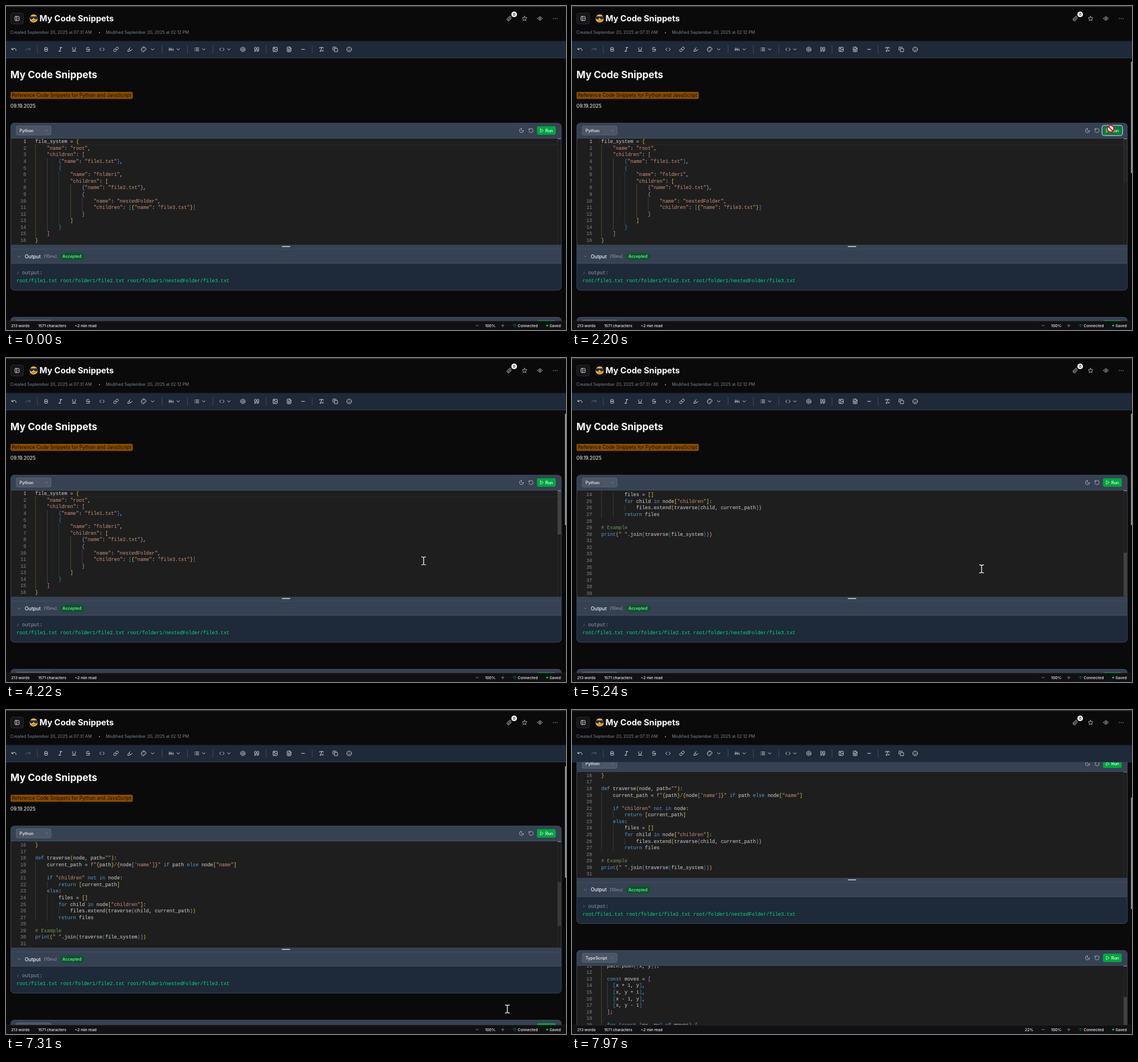
These frames come from a looping animation (983 px wide and 570 px high, 8000 ms). An HTML page:

```html
<!DOCTYPE html>
<html lang="en">
<head>
<meta charset="utf-8">
<title>My Code Snippets</title>
<style>
  html, body { margin: 0; width: 100%; height: 100%; overflow: hidden; background: #0a0a0a; }
  #stage { display: block; width: 100vw; height: 100vh; }
  text { font-family: Inter, sans-serif; white-space: pre; }
  .mono { font-family: "Liberation Mono", monospace; font-size: 8.54px; }
  .icon { fill: none; stroke-linecap: round; stroke-linejoin: round; }
</style>
</head>
<body>
<svg id="stage" viewBox="0 0 983 570"></svg>
<script>
const LOOP = 8000, STEP = 67.2;
const LINE = 11.58, CHAR = 5.124, CODE_X = 51.3;
const EDITOR_H = 187, CODE_H = 39 * LINE;
const GRAY7 = '#364153', GRAY8 = '#1e2939', BORDER = '#4a5565', MUTED = '#99a1af';
const GREEN = '#00a63e', GREEN_HOVER = '#008236';

const ICONS = {
  panel: 'M5 3h14a2 2 0 0 1 2 2v14a2 2 0 0 1-2 2H5a2 2 0 0 1-2-2V5a2 2 0 0 1 2-2zM9 3v18M14 9l3 3-3 3',
  clip: 'm21.44 11.05-9.19 9.19a6 6 0 0 1-8.49-8.49l8.57-8.57A4 4 0 1 1 18 8.84l-8.59 8.57a2 2 0 0 1-2.83-2.83l8.49-8.48',
  star: 'm12 2 3.1 6.3 6.9 1-5 4.9 1.2 6.8-6.2-3.2L5.8 21 7 14.2 2 9.3l6.9-1z',
  eye: 'M2 12s3.6-7 10-7 10 7 10 7-3.6 7-10 7-10-7-10-7zM15 12a3 3 0 1 1-6 0 3 3 0 0 1 6 0',
  dots: 'M4 12h.5M12 12h.5M20 12h.5',
  undo: 'M3 7v6h6M21 17a9 9 0 0 0-9-9 9 9 0 0 0-6 2.3L3 13',
  redo: 'M21 7v6h-6M3 17a9 9 0 0 1 9-9 9 9 0 0 1 6 2.3l3 2.7',
  bold: 'M6 12h9a4 4 0 0 1 0 8H7a1 1 0 0 1-1-1V5a1 1 0 0 1 1-1h7a4 4 0 0 1 0 8',
  italic: 'M19 4h-9M14 20H5M15 4 9 20',
  underline: 'M6 4v6a6 6 0 0 0 12 0V4M4 20h16',
  strike: 'M16 4H9a3 3 0 0 0-2.83 4M14 12a4 4 0 0 1 0 8H6M4 12h16',
  code: 'm16 18 6-6-6-6M8 6l-6 6 6 6',
  link: 'M10 13a5 5 0 0 0 7.54.54l3-3a5 5 0 0 0-7.07-7.07l-1.72 1.71M14 11a5 5 0 0 0-7.54-.54l-3 3a5 5 0 0 0 7.07 7.07l1.71-1.71',
  marker: 'm9 11-6 6v3h9l3-3M22 12l-4.6 4.6a2 2 0 0 1-2.8 0l-5.2-5.2a2 2 0 0 1 0-2.8L14 4',
  palette: 'M12 2a10 10 0 0 0 0 20c2 0 2.2-1.8 1.2-2.8-1-1.100-.2-2.800 1.200-2.800h2c3 0 5.600-2.500 5.600-5.600C22 6 17.500 2 12 2zM13.500 6.500h.01M17.500 10.500h.01M8.500 7.500h.01M6.500 12.500h.01',
  down: 'm6 9 6 6 6-6',
  right: 'm9 18 6-6-6-6',
  h1: 'M4 12h8M4 18V6M12 18V6M17 12l3-2v8',
  list: 'M3 6h.01M3 12h.01M3 18h.01M8 6h13M8 12h13M8 18h13',
  nut: 'M21 16V8a2 2 0 0 0-1-1.73l-7-4a2 2 0 0 0-2 0l-7 4A2 2 0 0 0 3 8v8a2 2 0 0 0 1 1.73l7 4a2 2 0 0 0 2 0l7-4A2 2 0 0 0 21 16zM16 12a4 4 0 1 1-8 0 4 4 0 0 1 8 0',
  quote: [16, 5].map(x => `M${x} 3a2 2 0 0 0-2 2v6a2 2 0 0 0 2 2 1 1 0 0 1 1 1v1a2 2 0 0 1-2 2 1 1 0 0 0-1 1v2a1 1 0 0 0 1 1 6 6 0 0 0 6-6V5a2 2 0 0 0-2-2z`).join(''),
  image: 'M5 3h14a2 2 0 0 1 2 2v14a2 2 0 0 1-2 2H5a2 2 0 0 1-2-2V5a2 2 0 0 1 2-2zM11 9a2 2 0 1 1-4 0 2 2 0 0 1 4 0M21 15l-3.1-3.1a2 2 0 0 0-2.8 0L6 21',
  file: 'M15 2H6a2 2 0 0 0-2 2v16a2 2 0 0 0 2 2h12a2 2 0 0 0 2-2V7zM14 2v4a2 2 0 0 0 2 2h4M10 9H8M16 13H8M16 17H8',
  minus: 'M5 12h14',
  plus: 'M5 12h14M12 5v14',
  clear: 'M4 7V4h16v3M5 20h6M13 4 8 20M15 15l5 5M20 15l-5 5',
  copy: 'M10 8h10a2 2 0 0 1 2 2v10a2 2 0 0 1-2 2H10a2 2 0 0 1-2-2V10a2 2 0 0 1 2-2zM4 16a2 2 0 0 1-2-2V4a2 2 0 0 1 2-2h10a2 2 0 0 1 2 2',
  smile: 'M22 12a10 10 0 1 1-20 0 10 10 0 0 1 20 0M8 14s1.5 2 4 2 4-2 4-2M9 9h.01M15 9h.01',
  moon: 'M12 3a6 6 0 0 0 9 9 9 9 0 1 1-9-9',
  reset: 'M3 12a9 9 0 1 0 9-9 9.75 9.75 0 0 0-6.74 2.74L3 8M3 3v5h5',
  play: 'M6 3l14 9-14 9z',
  wifi: 'M12 20h.01M8.5 16.4a5 5 0 0 1 7 0M5 12.9a10 10 0 0 1 14 0M2 8.800a15 15 0 0 1 20 0',
};

const PYTHON = `file_system = {
    "name": "root",
    "children": [
        {"name": "file1.txt"},
        {
            "name": "folder1",
            "children": [
                {"name": "file2.txt"},
                {
                    "name": "nestedFolder",
                    "children": [{"name": "file3.txt"}]
                }
            ]
        }
    ]
}

def traverse(node, path=""):
    current_path = f"{path}/{node['name']}" if path else node["name"]

    if "children" not in node:
        return [current_path]
    else:
        files = []
        for child in node["children"]:
            files.extend(traverse(child, current_path))
        return files

# Example
print(" ".join(traverse(file_system)))` + '\n'.repeat(9);

const TYPESCRIPT = `  path.push([x, y]);

  const moves = [
    [x + 1, y],
    [x, y + 1],
    [x - 1, y],
    [x, y - 1]
  ];

  for (const [nx, ny] of moves) {
    dfs(nx, ny);
  }`;

// Markup helpers; y is the vertical centre of the text or icon
const rect = (x, y, w, h, fill, extra = '') =>
  `<rect x="${x}" y="${y}" width="${w}" height="${h}" fill="${fill}" ${extra}/>`;
const text = (x, y, s, size, fill, weight = 400, extra = '') =>
  `<text x="${x}" y="${y + size * .36}" font-size="${size}" fill="${fill}" font-weight="${weight}" ${extra}>${s}</text>`;
const mono = (x, y, s, fill, extra = '') =>
  `<text class="mono" x="${x}" y="${y + 2.7}" fill="${fill}" ${extra}>${s}</text>`;
const icon = (name, x, y, color = '#f3f4f6', size = 9.8, weight = 2) =>
  `<path class="icon" d="${ICONS[name]}" stroke="${color}" stroke-width="${weight}" transform="translate(${x} ${y}) scale(${size / 24}) translate(-12 -12)"/>`;
const clipped = (x, y, w, h, body) =>
  `<svg x="${x}" y="${y}" width="${w}" height="${h}" viewBox="${x} ${y} ${w} ${h}">${body}</svg>`;

const BRACKETS = ['#e8c84a', '#c690c2', '#2f93cf'];
const KEYWORDS = /^(def|if|else|for|in|not|return|print|const|of)$/;
const span = (s, fill) => `<tspan fill="${fill}">${s}</tspan>`;

function highlight(line, state) {
  return (line.match(/#.*|f?"[^"]*"|'[^']*'|\w+|[^]/g) || []).map(token => {
    if (token[0] === '#') return span(token, '#6a9955');
    if (token.startsWith('f"'))
      return token.split(/(\{[^}]*\})/).map(p => p[0] === '{' ? highlight(p, state) : span(p, '#ce9178')).join('');
    if (/^["']/.test(token)) return span(token, '#ce9178');
    if (KEYWORDS.test(token)) return span(token, '#569cd6');
    if (/^\d/.test(token)) return span(token, '#b5cea8');
    if (/[[({]/.test(token)) return span(token, BRACKETS[state.depth++ % 3]);
    if (/[\])}]/.test(token)) return span(token, BRACKETS[--state.depth % 3]);
    return token;
  }).join('');
}

function codeLines(source, first, top, tab, depth) {
  const lines = source.split('\n'), state = { depth };
  const indent = i => {
    while (i < lines.length && !lines[i]) i++;
    return i < lines.length ? lines[i].search(/\S/) : 0;
  };
  return lines.map((line, i) => {
    const y = top + 5.6 + (first + i - 1) * LINE;
    let out = mono(35.5, y, first + i, first + i === 1 ? '#c6c6c6' : '#858585', 'text-anchor="end"');
    for (let k = 0; k * tab < indent(i); k++) {
      const paired = state.depth > k;
      out += rect(CODE_X + .2 + k * tab * CHAR, y - LINE / 2, .7, LINE + .1,
        paired ? BRACKETS[k % 3] : '#454545', paired ? 'opacity=".38"' : '');
    }
    return out + mono(CODE_X, y, highlight(line, state), '#d4d4d4');
  }).join('');
}

function block(id, top, language, code) {
  const mid = top + 13, editor = top + 27;
  return rect(8.4, top, 966.4, 294, GRAY7, `rx="6" stroke="${BORDER}" stroke-width=".8"`)
    + rect(18, mid - 8, 61, 16, BORDER, 'rx="2.500" stroke="#6a7282" stroke-width=".7"')
    + text(23.8, mid + .3, language, 7.32, '#f3f4f6', 500) + icon('down', 71, mid, MUTED, 7)
    + icon('moon', 905, mid, '#b8bfca') + icon('reset', 921.7, mid, '#b8bfca')
    + rect(932, mid - 7.5, 33, 15, GREEN, `id="${id}-run" rx="3"`)
    + icon('play', 940.3, mid, '#fff', 8) + text(946.7, mid + .3, 'Run', 7.32, '#fff', 500)
    + rect(930.4, mid - 8.900, 36, 17.800, 'none', `id="${id}-ring" rx="4" stroke="#b4cdf2" stroke-width="1.3" visibility="hidden"`)
    + clipped(9, editor, 965.4, EDITOR_H,
        rect(9, editor, 966, EDITOR_H, '#1e1e1e') + `<g id="${id}-code">${code}</g>`
        + rect(968, editor, .6, EDITOR_H, '#333') + rect(968.6, editor, 6, 1.2, '#8a8a8a')
        + rect(968.4, editor, 6.2, EDITOR_H * EDITOR_H / CODE_H, '#797979', `id="${id}-slider" opacity="0"`))
    + rect(9, editor - .7, 965.4, .7, BORDER)
    + rect(484, top + 216.600, 15, 1.4, '#d1d5db', 'rx=".7"')
    + rect(9, top + 221.500, 965.4, .7, BORDER)
    + icon('down', 23.5, top + 234.5, MUTED, 8) + text(33, top + 234.5, 'Output', 8.54, '#f3f4f6', 500)
    + text(66.3, top + 234.5, '(10ms)', 7.32, MUTED)
    + rect(95, top + 228, 42.5, 13, '#0d542b', 'rx="6.5"') + text(99, top + 234.5, 'Accepted', 7.32, '#7bf1a8', 500)
    + `<path d="M8.800 ${top + 247}H974.400V${top + 288}a5.600 5.600 0 0 1-5.600 5.600H14.400a5.600 5.600 0 0 1-5.600-5.600z" fill="${GRAY8}"/>`
    + rect(9, top + 246.5, 965.4, .7, BORDER)
    + icon('right', 21, top + 263.7, MUTED, 7) + mono(28.3, top + 263.5, 'output:', MUTED)
    + mono(18.5, top + 277.5, 'root/file1.txt root/folder1/file2.txt root/folder1/nestedFolder/file3.txt', '#05df72');
}

const TOP = 206, TOP2 = 547.5;
const page = text(7.800, 121.3, 'My Code Snippets', 17.08, '#fff', 700)
  + rect(8, 151, 214.5, 12.5, '#894b00', 'rx="2"')
  + text(10, 157.3, 'Reference Code Snippets for Python and JavaScript', 8.54, '#0e0c08')
  + text(7.800, 175.5, '09.19.2025', 8.54, '#fff')
  + block('py', TOP, 'Python',
      rect(48, TOP + 27.400, 920, LINE - .8, 'none', 'stroke="#2a2a2a"') + codeLines(PYTHON, 1, TOP + 27, 4, 0))
  + block('ts', TOP2, 'TypeScript', codeLines(TYPESCRIPT, 11, TOP2 + 27, 2, 1));

const emoji = `<circle cx="48.5" cy="22" r="7.2" fill="#f5b13d"/>
  <path d="M41.500 18.300h14v2.200q-.4 3.300-3.300 3.300-2.700 0-3.200-3h-1q-.5 3-3.200 3-2.900 0-3.300-3.300z" fill="#252a3c"/>
  <path class="icon" d="M45.800 26q2.800 1.700 5.400-.4" stroke="#6b3b12" stroke-width=".9"/>`;

const header = rect(0, 0, 983, 92, '#0a0a0a') + rect(0, 0, 983, 1.800, '#303033')
  + rect(8.400, 12.400, 22.200, 19.200, '#161618', 'rx="4" stroke="#35353a" stroke-width=".8"')
  + icon('panel', 19.5, 22) + emoji
  + text(58.800, 22.2, 'My Code Snippets', 14.64, '#fff', 700)
  + text(7.800, 46.700, 'Created September 20, 2025 at 07:31 AM', 7.32, '#7d8490')
  + '<circle cx="164" cy="46.900" r="1.1" fill="#7d8490"/>'
  + text(175.2, 46.700, 'Modified September 20, 2025 at 02:12 PM', 7.32, '#7d8490')
  + icon('clip', 883.5, 22, '#d1d5db') + '<circle cx="892" cy="14.700" r="4.900" fill="#fafafa"/>'
  + text(892, 14.800, '0', 6.2, '#111', 600, 'text-anchor="middle"')
  + icon('star', 910.3, 22, '#d1d5db') + icon('eye', 937.3, 22, '#d1d5db') + icon('dots', 964, 22, '#f3f4f6', 9.8, 3)
  + rect(0, 61.500, 983, 30, GRAY8) + rect(0, 91, 983, .800, GRAY7)
  + Object.entries({
      14: 'undo', 70.5: 'bold', 95.3: 'italic', 119.5: 'underline', 144: 'strike', 168.5: 'code', 193: 'link',
      217.3: 'marker', 241.700: 'palette', 257.5: 'down', 290: 'h1', 302.3: 'down', 334.700: 'list', 346.900: 'down',
      379: 'code', 391.2: 'down', 415.700: 'nut', 440: 'quote', 472.5: 'image', 497: 'file', 521.4: 'minus',
      553.700: 'clear', 578: 'copy', 602.5: 'smile'
    }).map(([x, name]) => icon(name, x, 76.3)).join('')
  + icon('redo', 38.5, 76.3, '#68717f')
  + [55, 274, 318.3, 363, 456.3, 537.3].map(x => rect(x - .4, 69, .8, 14.5, BORDER)).join('');

const status = rect(0, 554, 983, 16, '#111113') + rect(0, 554, 983, .7, '#2a2a2e')
  + [[9, '213 words'], [56.5, '1571 characters'], [121, '~2 min read'], [841, '100%'], [898.3, 'Connected'], [954, 'Saved']]
      .map(([x, s]) => text(x, 562.3, s, 6.7, '#f3f4f6', 500)).join('')
  + text(810, 562.3, '', 6.7, '#f3f4f6', 500, 'id="percent" text-anchor="end"')
  + icon('minus', 827, 562.2, '#b8bfca', 7.5) + icon('plus', 872, 562.2, '#b8bfca', 7.5)
  + icon('wifi', 893, 562, '#0b8a3c', 7.5) + '<circle cx="950" cy="562.3" r="1.700" fill="#00c950"/>';

const cursors = {
  beam: '<path class="icon" d="M-3.500-7q3 0 3.500 1.300q.5-1.300 3.500-1.300M0-5.700V5.700M-3.500 7q3 0 3.500-1.300q.5 1.300 3.500 1.300" stroke="#fff" stroke-width="1.3"/>',
  arrow: '<path d="M0 0v13l3-2.800 2 4.600 2-.9-2-4.500h4z" fill="#fff" stroke="#111" stroke-width=".7"/>',
  hand: '<path d="M-1-5q1-1.300 2 0v4l5 1.200q1 .4.800 1.500L6 7H0L-4 2q0-1.300 1.300-1L-1 2z" fill="#fff" stroke="#111" stroke-width=".7"/>',
  blocked: '<circle r="5.700" fill="#fff" stroke="#c5161d" stroke-width="2"/><path d="M-4-4 4 4" stroke="#c5161d" stroke-width="2.2"/>',
};

const stage = document.getElementById('stage');
stage.innerHTML = rect(0, 0, 983, 570, '#0a0a0a')
  + clipped(0, 91.5, 983, 463, `<g id="page">${page}</g>`)
  + header + status + rect(981.3, 98, 1.700, 196, '#a1a1aa', 'id="scrollbar"')
  + Object.entries(cursors).map(([name, body]) => `<g id="${name}">${body}</g>`).join('');

const $ = id => document.getElementById(id);
const set = (id, name, value) => $(id).setAttribute(name, value);
const show = (id, on) => set(id, 'visibility', on ? 'visible' : 'hidden');
const shift = (id, x, y) => set(id, 'transform', `translate(${x} ${y})`);

// Piecewise linear value from [time, value, ...] keys; column picks the value
function track(keys, t, column = 1) {
  const i = keys.findIndex(k => k[0] > t);
  if (i === 0) return keys[0][column];
  if (i < 0) return keys[keys.length - 1][column];
  const a = keys[i - 1], b = keys[i];
  return a[column] + (b[column] - a[column]) * (t - a[0]) / (b[0] - a[0]);
}

const POINTER = [[1200, 990, 252], [1450, 968, 240], [1870, 945.5, 216], [3770, 945.5, 216], [4000, 850, 285],
  [4217, 733, 357], [4490, 719, 371], [5840, 719, 371], [6240, 733, 381], [6380, 733, 381], [6570, 738, 384],
  [6650, 738, 384], [6780, 768, 412], [6910, 852, 521], [7040, 877, 548], [7170, 880, 526], [7308, 880, 526],
  [7442, 887, 516], [7800, 992, 500]];
const PAGE_SCROLL = [[7240, 0], [7308, 2], [7375, 62], [7442, 86.5], [7510, 103], [7577, 113], [7710, 121], [7960, 124.5]];
const CODE_SCROLL = [[4700, 0], [4900, 183], [5110, 183], [5220, 264.4], [5840, 264.4], [6240, 172.700]];
const SLIDER = [[1300, 0], [1400, .4], [1870, .4], [2200, .08], [2500, 0], [3830, 0], [3960, .4], [7170, .4], [7308, .3], [7442, .1], [7580, 0]];

function draw(now) {
  const t = Math.max(0, 1260 + Math.floor((now % LOOP - 1250) / STEP) * STEP);
  const scroll = track(PAGE_SCROLL, t), codeScroll = track(CODE_SCROLL, t);
  const x = track(POINTER, t), y = track(POINTER, t, 2);

  shift('page', 0, -scroll);
  shift('py-code', 0, -codeScroll);
  shift('ts-code', 0, -121.4);
  shift('py-slider', 0, codeScroll * EDITOR_H / CODE_H);
  shift('ts-slider', 0, 55);
  set('py-slider', 'opacity', track(SLIDER, t));
  set('ts-slider', 'opacity', track([[7375, .1], [7650, .4]], t));
  show('scrollbar', t > 1300);
  shift('scrollbar', 0, scroll * .45);
  $('percent').textContent = t > 7350 ? Math.round(track(PAGE_SCROLL, t - STEP) / 5.64) + '%' : '';

  const running = t >= 2060 && t < 2460;
  const hover = x > 932 && x < 965 && y > 211 && y < 227;
  set('py-run', 'fill', hover ? GREEN_HOVER : GREEN);
  show('py-ring', running);
  const kind = running ? 'blocked' : hover ? 'hand' : x < 975 && y > 233 ? 'beam' : 'arrow';
  for (const name in cursors) show(name, name === kind && t > 1250);
  shift(kind, x, y);
}

const start = performance.now();
(function frame() {
  draw(performance.now() - start);
  requestAnimationFrame(frame);
})();
</script>
</body>
</html>
```
